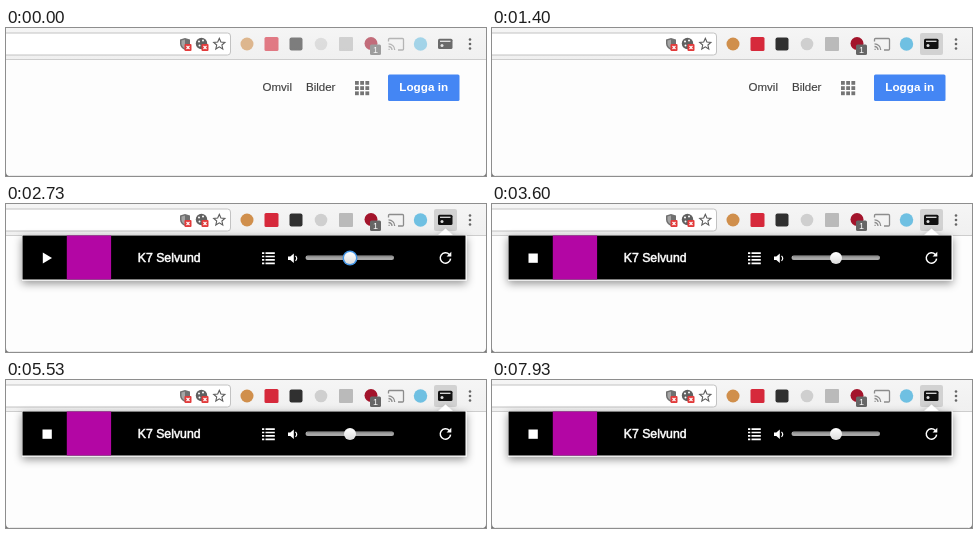
An HTML page for the animation above (8000 ms loop, 480x148 px).

```html
<!DOCTYPE html>
<html lang="sv">
<head>
<meta charset="utf-8">
<style>
html, body { margin: 0; width: 100%; height: 100%; overflow: hidden; background: #fdfdfd; }
svg { display: block; width: 480px; height: 148px; font-family: "Liberation Sans", Arial, sans-serif; }
</style>
</head>
<body>
<svg viewBox="0 0 480 148">
  <defs>
    <linearGradient id="bar" x2="0" y2="1">
      <stop stop-color="#f5f5f5"/><stop offset="1" stop-color="#f0f0f0"/>
    </linearGradient>
    <linearGradient id="knob" x2="0" y2="1">
      <stop stop-color="#fff"/><stop offset="1" stop-color="#dcdcdc"/>
    </linearGradient>
    <filter id="shadow" x="-10%" y="-40%" width="120%" height="200%">
      <feDropShadow dx="0" dy="3" stdDeviation="4" flood-opacity=".42"/>
    </filter>
    <g id="blocked">
      <rect x="1" y="1.500" width="7" height="7" rx="1" fill="#e23b3b"/>
      <path d="M3 3.500l3 3m0-3l-3 3" stroke="#fff" stroke-width="1.100"/>
    </g>
  </defs>

  <!-- page -->
  <rect width="480" height="148" fill="#fdfdfd"/>
  <g font-size="11.500" fill="#404040" stroke="#404040" stroke-width=".15">
    <text x="256.600" y="63.300">Omvil</text>
    <text x="300" y="63.300">Bilder</text>
  </g>
  <g id="apps" fill="#757575"></g>
  <rect x="382" y="46.500" width="71.500" height="26.500" rx="1.500" fill="#4486f4"/>
  <text x="417.700" y="63.300" font-size="11.700" font-weight="bold" fill="#fff" text-anchor="middle">Logga in</text>
  <path d="M0 144v4h4q-4 0-4-4M480 144v4h-4q4 0 4-4" fill="#777"/>
  <path d="M4 147.700H476" stroke="#d5d5d5" stroke-width=".6"/>

  <!-- toolbar -->
  <rect width="480" height="31.500" fill="url(#bar)"/>
  <path d="M0 31.500H480" stroke="#cdcdcd"/>
  <rect x="-5" y="5" width="229.500" height="22" rx="3" fill="#fff" stroke="#c2c2c2"/>
  <path d="M179 10l5 1.500v4q0 4-5 6.500q-5-2.500-5-6.500v-4z" fill="#707070"/>
  <path d="M179 11.500v9q-3.500-2-3.500-5v-3z" fill="#a5a5a5"/>
  <use href="#blocked" x="177.500" y="14.500"/>
  <circle cx="195.500" cy="15.500" r="5.700" fill="#606060"/>
  <g fill="#fff"><circle cx="193" cy="13.500" r="1"/><circle cx="197" cy="12.500" r="1"/><circle cx="193.500" cy="17.500" r="1"/></g>
  <use href="#blocked" x="194.500" y="14.500"/>
  <path d="M213.300 10.300l1.600 3.700 4 .4-3 2.600.9 4-3.500-2.100-3.500 2.100.9-4-3-2.600 4-.4z" fill="none" stroke="#5c5c5c" stroke-width="1.100"/>

  <rect id="pressed" x="428" y="5" width="23" height="22" rx="2" fill="#d2d2d2"/>
  <g id="extensions">
    <circle cx="241" cy="16" r="6.500" fill="#d08f4c"/>
    <rect x="258.500" y="9" width="14" height="14" rx="1.500" fill="#d6293b"/>
    <rect x="283.500" y="9.500" width="13" height="13" rx="2" fill="#303030"/>
    <circle cx="315" cy="16" r="6.300" fill="#cfcfcf"/>
    <rect x="333" y="9" width="14" height="14" rx="1" fill="#bababa"/>
    <circle cx="365" cy="15.500" r="6.500" fill="#a3142b"/>
    <rect x="364" y="16.500" width="11" height="10.500" rx="1.500" fill="#666"/>
    <text x="369.500" y="25" font-size="9" fill="#fff" text-anchor="middle">1</text>
    <g fill="none" stroke="#8c8c8c" stroke-width="1.300">
      <path d="M382.500 13.500v-2q0-1 1-1h13q1 0 1 1v9.500q0 1-1 1h-4.500M382.500 15.800a6.200 6.200 0 0 1 6.200 6.200M382.500 18.500a3.500 3.500 0 0 1 3.500 3.500"/>
      <path d="M382.500 21.400h1.200"/>
    </g>
    <circle cx="414.500" cy="16" r="6.700" fill="#6fc0e2"/>
    <rect x="432" y="10.700" width="14.500" height="10.300" rx="1.500" fill="#111"/>
    <path d="M434 13.300h10.500" stroke="#ddd" stroke-width="1.300"/>
    <circle cx="436" cy="17.500" r="1.500" fill="#ddd"/>
  </g>
  <g fill="#666"><circle cx="464" cy="11.500" r="1.300"/><circle cx="464" cy="16" r="1.300"/><circle cx="464" cy="20.500" r="1.300"/></g>

  <!-- radio popup -->
  <g id="popup" transform="translate(0 -.5)">
    <path d="M16 31.500H432.500L439.500 25L446.500 31.500H460.500V77H16z" fill="#fff" filter="url(#shadow)"/>
    <rect x="16.500" y="32" width="443" height="44" fill="#000"/>
    <rect x="60.800" y="32" width="44.300" height="44" fill="#b306a4"/>
    <path id="play" d="M36.800 49L46 54.500L36.800 60z" fill="#fff"/>
    <rect id="stop" x="36.500" y="50" width="9.300" height="9.300" fill="#fff"/>
    <text x="131.700" y="58.400" font-size="12.300" fill="#fff" stroke="#fff" stroke-width=".5">K7 Selvund</text>
    <path d="M256 49.600h2.300m1.200 0h9.300M256 53h2.300m1.200 0h9.300M256 56.400h2.300m1.200 0h9.300M256 59.800h2.300m1.200 0h9.300" stroke="#fff" stroke-width="1.700"/>
    <path d="M282 53h2.300l3.500-3v9.500l-3.500-3H282z" fill="#fff"/>
    <path d="M289.500 52.300q2.400 2.500 0 5" fill="none" stroke="#fff" stroke-width="1.200"/>
    <rect x="299.500" y="52" width="88.500" height="4.500" rx="2.200" fill="#a8a8a8"/>
    <path d="M301 53.300H387" stroke="#858585"/>
    <g id="thumb">
      <circle id="focus" r="7.500" cy="54.500" fill="#4596e6"/>
      <circle r="6" cy="54.500" fill="url(#knob)"/>
      <circle id="grabbed" r="6" cy="54.500" fill="#c4c4c4"/>
    </g>
    <path d="M443.300 51A5.200 5.200 0 1 0 444.600 55.100" fill="none" stroke="#fff" stroke-width="1.500"/>
    <path d="M445.300 48.300v4.700h-4.700z" fill="#fff"/>
  </g>
</svg>
<script>
const el = id => document.getElementById(id);
const show = (id, amount) => el(id).setAttribute("opacity", Number(amount));
const ramp = (t, from, to) => Math.min(1, Math.max(0, (t - from) / (to - from)));
const ease = p => p * p * (3 - 2 * p);

for (let i = 0; i < 9; i++) {
  const x = 349 + i % 3 * 5.2, y = 53 + Math.floor(i / 3) * 5.2;
  el("apps").innerHTML += `<rect x="${x}" y="${y}" width="3.8" height="3.8"/>`;
}

function draw(now) {
  const t = now % 8000;
  const playing = t >= 2870;
  show("extensions", 0.6 + 0.4 * ramp(t, 350, 480));
  show("pressed", t >= 1200);
  show("popup", ramp(t, 1470, 1600));
  show("play", !playing);
  show("stop", playing);
  show("focus", !playing);
  show("grabbed", t >= 3870 && t < 5500);
  const dip = ease(ramp(t, 3900, 4600)) - ease(ramp(t, 4760, 5460));
  el("thumb").setAttribute("transform", `translate(${344 - 26.6 * dip} 0)`);
  requestAnimationFrame(draw);
}
requestAnimationFrame(draw);
</script>
</body>
</html>
```
